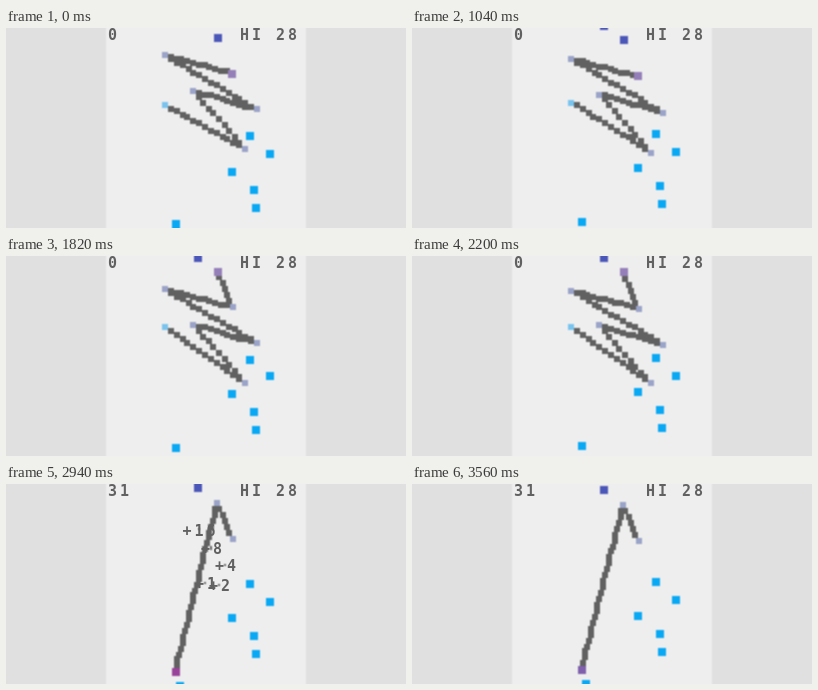
An HTML page with a canvas for the animation above (3.6 s loop, 400 by 200 pixels).

```html
<!DOCTYPE html>
<html lang="en">
<head>
<meta charset="utf-8">
<title>Zigzag chain</title>
<style>
  html, body { margin: 0; width: 100%; height: 100%; overflow: hidden; background: #e0e0e0; }
  canvas { display: block; width: 400px; height: 200px; }
</style>
</head>
<body>
<canvas id="stage" width="400" height="200"></canvas>
<script>
const ctx = document.getElementById('stage').getContext('2d');

// Cells are painted at half size, then enlarged with soft edges.
const layer = document.createElement('canvas');
layer.width = 200;
layer.height = 100;
const cells = layer.getContext('2d');

const LOOP = 3600, JOIN = 1700, BURST = 2940, TICK = 1000 / 60;
const SPEED = 0.0016; // cells per ms
const INK = '#616161', NODE = '#9aa3c8', TIP = '#78c4ee', BLUE = '#4a56b8', CYAN = '#08a8f4', PINK = '#e91e63';

// y is the position at the start of the loop; dir is the drift.
const dot = (x, y, dir = 1) => ({ x, y, dir });
const at = (d, t) => ({ x: d.x, y: d.y + d.dir * SPEED * t });

const chain = [dot(30, 39.2, -1), dot(70, 60.85), dot(44, 31.85),
               dot(76, 41.25), dot(30, 14.25), dot(63.6, 23.2)];
const joint = chain[5];
const upper = dot(56, 5.3);
const lower = dot(35, 98.95, -1);
const waiting = dot(46, -1.8);
const rising = [dot(72, 54.95, -1), dot(82, 63.8, -1), dot(63, 72.25, -1),
                dot(74, 81.25, -1), dot(75, 90.25, -1), dot(37, 106.15, -1)];

let seed = 41;
function random(min = 0, max = 1) {
  seed = (seed * 16807) % 2147483647;
  return min + (max - min) * seed / 2147483647;
}

function spark(x, y, color) {
  const angle = random(0, Math.PI * 2), speed = random(0.5, 1);
  return { x, y, color, vx: Math.cos(angle) * speed, vy: Math.sin(angle) * speed, life: random(10, 20) };
}

// Each cut link leaves a score and grey sparks at its middle.
const scores = [], sparks = [];
for (let i = 0; i < 5; i++) {
  const a = at(chain[i], BURST), b = at(chain[i + 1], BURST);
  const x = (a.x + b.x) / 2, y = (a.y + b.y) / 2;
  scores.push({ x, y, label: '+' + 2 ** i });
  for (let k = 0; k < 18; k++) sparks.push(spark(x, y, INK));
}
const from = at(upper, BURST), to = at(lower, BURST);
for (let i = 0; i < 160; i++) {
  const k = i / 159;
  sparks.push(spark(from.x + (to.x - from.x) * k, from.y + (to.y - from.y) * k, PINK));
}

function box(p, size, color) {
  cells.fillStyle = color;
  cells.fillRect(50 + Math.floor(p.x - size / 2), Math.floor(p.y - size / 2), size, size);
}

function link(a, b) {
  const dx = b.x - a.x, dy = b.y - a.y;
  const steps = Math.max(2, Math.ceil(Math.max(Math.abs(dx), Math.abs(dy)) / 3));
  for (let i = 0; i <= steps; i++) {
    box({ x: a.x + dx * i / steps, y: a.y + dy * i / steps }, 3, INK);
  }
}

function print(text, x, baseline) {
  ctx.fillStyle = INK;
  ctx.font = 'bold 15px "DejaVu Sans Mono", monospace';
  ctx.textAlign = 'center';
  [...text].forEach((c, i) => ctx.fillText(c, x + 12 * i + 5.5, baseline));
}

function drawSparks(n) {
  const reach = (1 - 0.98 ** n) / 0.02;
  for (const s of sparks) {
    if (n < s.life) box({ x: s.x + s.vx * reach, y: s.y + s.vy * reach }, 1, s.color);
  }
}

function drawScores(n) {
  if (n >= 30) return;
  const rise = 20 * (1 - 0.9 ** n);
  for (const s of scores) {
    print(s.label, 100 + 2 * s.x - 6 * s.label.length, 2 * (s.y - rise) + 5);
  }
}

function draw(t) {
  const joined = t >= JOIN, cut = t >= BURST, age = (t - BURST) / TICK;
  cells.fillStyle = '#e0e0e0';
  cells.fillRect(0, 0, 200, 100);
  cells.fillStyle = '#eeeeee';
  cells.fillRect(50, 0, 100, 100);
  if (cut) drawSparks(age);

  const path = cut ? [joint, upper, lower] : joined ? [...chain, upper] : chain;
  const points = path.map(d => at(d, t));
  for (let i = 1; i < points.length; i++) link(points[i - 1], points[i]);

  for (const d of rising) box(at(d, t), 4, CYAN);
  if (!cut) box(at(lower, t), 4, CYAN);
  if (!joined) box(at(upper, t), 4, BLUE);
  box(at(waiting, t), 4, BLUE);

  const head = points.pop();
  points.forEach((p, i) => box(p, 3, !cut && i === 0 ? TIP : NODE));
  box(head, 4, !cut ? '#957fb9' : t < 3360 ? '#994299' : '#7f60ac');

  ctx.drawImage(layer, 0, 0, 400, 200);
  if (cut) drawScores(age);
  print(cut ? '31' : '0', 101, 12);
  print('HI 28', 233, 12);
}

function frame() {
  draw(performance.now() % LOOP);
  requestAnimationFrame(frame);
}
frame();
</script>
</body>
</html>
```
